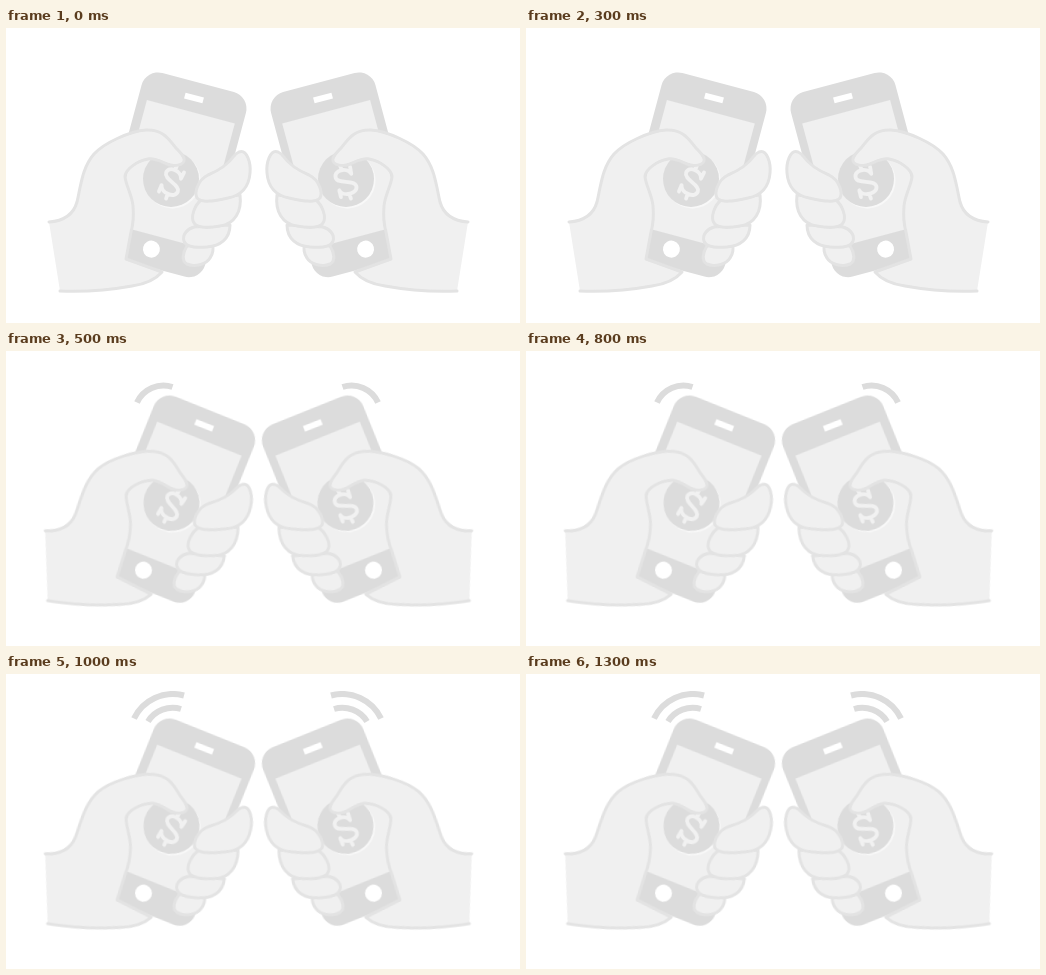
Write an HTML page that moves like this. It is 514 px wide and 295 px high and loops after 1.5 s.

```html
<!DOCTYPE html>
<html lang="en">
<head>
<meta charset="utf-8">
<title>Phones exchanging money</title>
<style>
  html, body { margin: 0; width: 100%; height: 100%; overflow: hidden; background: #fff; }
  svg { display: block; width: 100%; height: 100%; }
  .grip { transform-origin: 165px 151px; }
  .skin { fill: #f0f0f0; stroke: #e3e3e3; stroke-width: 3; stroke-linejoin: round; stroke-linecap: round; }
  .body, .coin { fill: #dcdcdc; }
  .screen { fill: #f0f0f0; }
  .hole { fill: #fff; }
  .glow { fill: #f8f8f8; }
  .dollar, .wave { fill: none; stroke-linejoin: round; }
  .dollar { stroke: #f1f1f1; stroke-width: 3.8; stroke-linecap: round; }
  .wave { stroke: #dcdcdc; stroke-width: 6; opacity: 0; }
</style>
</head>
<body>
<svg id="stage" viewBox="0 0 514 295"></svg>
<script>
const LOOP = 1500;

const PALM = `M43 194 C57 193 67 188 71 174 C75 157 76 140 88 126
  C98 115 124 103 140 102 C158 101 164 113 170 120 C175 125 179 129 178 133
  C177 137 168 139 161 136 C154 133 149 130 142 131 C131 133 120 141 119 148
  C119 156 126 166 127 178 C128 189 127 197 125 204 L120 231 L156 244
  C150 251 140 256 126 258 C104 262 80 264 54 263`;

// little finger first, so the upper ones overlap it
const FINGERS = [
  'M181 218 C177 224 175 233 181 236 C188 239 200 237 204 230 C207 226 208 220 206 216 Z',
  'M188 199 C181 201 176 207 178 213 C180 219 190 220 201 219 C214 218 224 211 224 197 Z',
  'M195 172 C189 177 184 189 188 195 C191 200 203 200 214 198 C229 196 236 183 234 167 Z',
  'M233 124 C241 121 245 135 244 145 C243 158 237 167 222 170 C212 172 197 176 191 170 C188 164 192 152 202 147 C214 142 223 135 228 128 C229 126 231 125 233 124 Z'
];

const DOLLAR = `M9 -13 L8 -6 C6 -14 -8 -15 -8 -7
  C-8 0 9 0 9 7 C9 15 -7 14 -8.500 6 L-9 13
  M0 -17.500 V-13 M0 13 V17.500`;

const WAVES = {
  mid:   'M131 51.500 A29 29 0 0 1 166.500 36',
  inner: 'M142 47.500 A29 29 0 0 1 175 35',
  outer: 'M128 44.500 A43 43 0 0 1 178 21.500'
};

const path = (cls, d) => `<path class="${cls}" d="${d}"/>`;
const mirror = (sum, flip) => flip < 0 ? `transform="matrix(-1 0 0 1 ${sum} 0)"` : '';

const phone = `<g transform="translate(188 70) rotate(15)">
  <rect class="body" x="-54" y="-16" width="108" height="191" rx="17"/>
  <rect class="screen" x="-45" y="14" width="91" height="129"/>
  <rect class="hole" x="-9.500" y="-3" width="19" height="6"/>
  <circle class="hole" cx="-2" cy="157" r="8.500"/>
</g>`;

// flip keeps the currency sign readable on the mirrored side
const coin = flip => `
  <circle class="glow" cx="${165 + flip * 1.5}" cy="152.500" r="28"/>
  <circle class="coin" cx="165" cy="151" r="28"/>
  <g transform="translate(165.500 154) rotate(18) scale(${flip} 1)">${path('dollar', DOLLAR)}</g>`;

const side = flip => `
  <g ${mirror(505, flip)}><g class="grip">
    ${phone}${coin(flip)}${path('skin', PALM)}
    ${FINGERS.map(d => path('skin', d)).join('')}
  </g></g>
  <g ${mirror(503, flip)}>
    ${Object.entries(WAVES).map(([name, d]) => path('wave ' + name, d)).join('')}
  </g>`;

document.getElementById('stage').innerHTML = side(1) + side(-1);

// one value per third of the loop, held until the next
const TILT = 'translate(.5px, 1px) rotate(7deg)';
const STEPS = {
  '.grip':  ['transform', ['none', TILT, TILT]],
  '.mid':   ['opacity', [0, 1, 0]],
  '.inner': ['opacity', [0, 0, 1]],
  '.outer': ['opacity', [0, 0, 1]]
};

for (const [selector, [prop, values]] of Object.entries(STEPS)) {
  const keys = [...values, values[2]].map((value, i) =>
    ({ [prop]: value, offset: i / 3, easing: 'step-end' }));
  for (const el of document.querySelectorAll(selector)) {
    el.animate(keys, { duration: LOOP, iterations: Infinity }).startTime = 0;
  }
}
</script>
</body>
</html>
```
